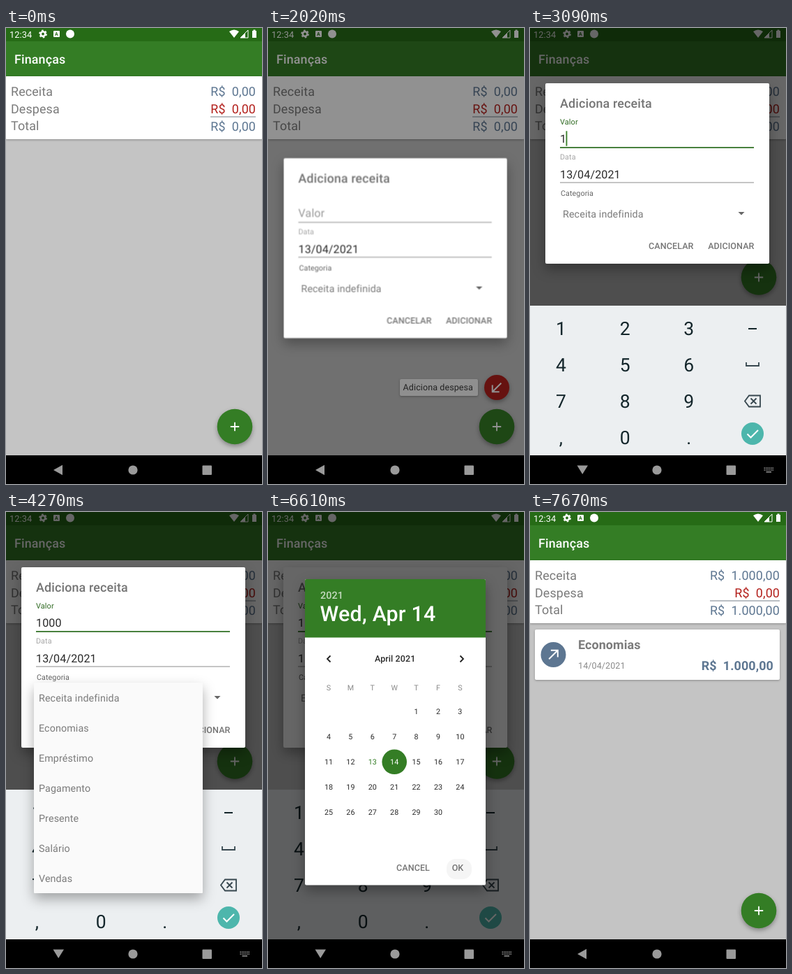
An HTML page for the animation above (8 s loop, 367 by 652 pixels).

```html
<!DOCTYPE html>
<html lang="pt-BR">
<head>
<meta charset="utf-8">
<title>Finanças</title>
<style>
html, body { margin: 0; width: 100%; height: 100%; overflow: hidden; background: #000; }
svg { display: block; width: 367px; height: 652px; }
text { font-family: Roboto, "Noto Sans", sans-serif; letter-spacing: .008em; text-rendering: geometricPrecision; }
.low { filter: drop-shadow(0 1px 1.5px rgba(0,0,0,.3)); }
.mid { filter: drop-shadow(0 3px 3px rgba(0,0,0,.32)); }
.high { filter: drop-shadow(0 8px 9px rgba(0,0,0,.32)); }
</style>
</head>
<body>
<svg id="stage" viewBox="0 0 367 652"></svg>
<script>
const LOOP = 8000;
const GREEN = '#347d25', SLATE = '#5d7691', RED = '#b3201c', GREY = '#7b7b7b', INK = '#2a2a2a';
const BODY = 14.29, FIELD = 16.07, TITLE = 17.86, SMALL = 12.5, TINY = 10.72;
const STANDARD = 'cubic-bezier(.4,0,.2,1)', OUT = 'cubic-bezier(0,0,.2,1)';
const stage = document.getElementById('stage');

function el(parent, tag, attrs = {}) {
  const node = document.createElementNS('http://www.w3.org/2000/svg', tag);
  for (const k in attrs) node.setAttribute(k, attrs[k]);
  parent.appendChild(node);
  return node;
}
const group = (p, attrs) => el(p, 'g', attrs);
const rect = (p, x, y, width, height, fill, more) => el(p, 'rect', { x, y, width, height, fill, ...more });
const disc = (p, cx, cy, r, fill, more) => el(p, 'circle', { cx, cy, r, fill, ...more });
const path = (p, d, fill, more) => el(p, 'path', { d, fill, ...more });
const line = (p, d, stroke, w = 1.5, more) => path(p, d, 'none', { stroke, 'stroke-width': w, ...more });

// Text whose capitals are centred on y
function text(p, x, y, str, size, fill, more) {
  const t = el(p, 'text', { x, y: y + size * .355, 'font-size': size, fill, ...more });
  t.textContent = str.replace(/  /g, '\u00a0\u00a0');
  return t;
}
const END = { 'text-anchor': 'end' }, MID = { 'text-anchor': 'middle' }, MEDIUM = { 'font-weight': 500 };

// steps: [start, end, value, easing]; equal start and end make a hard change
function track(node, prop, first, steps) {
  const frames = [{ offset: 0, [prop]: first }];
  let last = first;
  for (const [a, b, value, easing = 'linear'] of steps) {
    frames.push({ offset: a / LOOP, [prop]: last, easing }, { offset: b / LOOP, [prop]: value });
    last = value;
  }
  frames.push({ offset: 1, [prop]: last });
  node.animate(frames, { duration: LOOP, iterations: Infinity });
  return node;
}
const at = (t, value) => [t, t, value];
const fade = (node, ...steps) => track(node, 'opacity', 0, steps);
const show = (node, from, to) => fade(node, at(from, 1), at(to, 0));
const hide = (node, from, to) => track(node, 'opacity', 1, to ? [at(from, 0), at(to, 1)] : [at(from, 0)]);
const pivot = (node, x, y) => { node.style.transformOrigin = `${x}px ${y}px`; return node; };

function arrow(p, x, y, turn) {
  line(p, 'M-7 7L7-7M-4-7H7V4', '#fff', 2.2, { transform: `translate(${x} ${y}) rotate(${turn}) scale(.9)` });
}

/* App screen */
const app = group(stage);
rect(app, 0, 0, 367, 652, '#c4c4c4');
rect(app, 0, 0, 367, 20, '#266b16');
rect(app, 0, 19, 367, 50, GREEN);
text(app, 5, 9.2, '12:34', 12.8, '#fff');
disc(app, 53, 8.5, 3.2, 'none', { stroke: '#fff', 'stroke-width': 2.6 });
disc(app, 53, 8.5, 5, 'none', { stroke: '#fff', 'stroke-width': 1.8, 'stroke-dasharray': '2.6 2.636' });
rect(app, 68, 4, 9, 9, '#fff', { rx: 1 });
text(app, 72.5, 8.5, 'A', 7, '#266b16', { ...MID, 'font-weight': 700 });
disc(app, 92, 8.5, 6, '#fff');
path(app, 'M320 5Q327 0 334 5L327 14Z', '#fff');
path(app, 'M347 3V14H336Z', 'none', { stroke: '#fff' });
path(app, 'M343 7V14H336Z', '#fff');
path(app, 'M353 4H354.5V2.5H357.5V4H359V14H353Z', '#fff');
text(app, 12, 45, 'Finanças', TITLE, '#fff', MEDIUM);

const summary = group(app);
rect(summary, 0, 69, 367, 90, '#fff', { rx: 1, class: 'low' });
['Receita', 'Despesa', 'Total'].forEach((s, i) => text(summary, 7, 91 + 24.5 * i, s, TITLE, GREY));
text(summary, 358, 115.5, 'R$  0,00', TITLE, RED, END);
function totals(sum, x) {
  const g = group(summary);
  for (const y of [91, 140.5]) text(g, 358, y, sum, TITLE, SLATE, END);
  rect(g, x, 126.5, 358 - x, 1, '#77808a');
  return g;
}
hide(totals('R$  0,00', 293), 7540);
show(totals('R$  1.000,00', 258), 7540, LOOP);

const entry = show(group(app), 7540, LOOP);
rect(entry, 7, 168, 351, 72, '#fff', { rx: 2, class: 'low' });
disc(entry, 33.5, 204, 18, SLATE);
arrow(entry, 33.5, 204, 0);
text(entry, 69, 190, 'Economias', TITLE, GREY, { 'font-weight': 700 });
text(entry, 69, 219.5, '14/04/2021', SMALL, '#8a8a8a');
text(entry, 349, 219.5, 'R$  1.000,00', TITLE, SLATE, { ...END, 'font-weight': 700 });

// Floating button and its menu
function action(y, left, label, fill, turn, open, close) {
  const g = group(app);
  fade(g, [open, open + 100, 1], [close, close + 60, 0]);
  rect(g, left, y - 12, 301 - left, 24, '#fafafa', { rx: 2, class: 'low' });
  text(g, 294, y, label, SMALL, '#3c3c3c', END);
  const button = pivot(group(g, { class: 'mid' }), 328, y);
  disc(button, 328, y, 18, fill);
  arrow(button, 328, y, turn);
  track(button, 'scale', '0', [[open, open + 150, '1', OUT], [close, close + 60, '.3']]);
  return g;
}
const income = action(465, 197.5, 'Adiciona receita', SLATE, 0, 920, 1930);
action(514, 189, 'Adiciona despesa', RED, 180, 870, 2040);
const press = group(income);
rect(press, 197.5, 453, 103.5, 24, '#000', { rx: 2, opacity: .5 });
disc(press, 328, 465, 18, '#fff');
fade(press, [1590, 1660, .16]);

const fab = group(app);
track(fab, 'translate', '0 0', [at(2760, '0 -213.5px'), at(7560, '0 0')]);
disc(fab, 328, 570, 25.3, GREEN, { class: 'mid' });
fade(disc(fab, 328, 570, 25.3, '#fff'), [840, 920, .15], [960, 1110, 0]);
const plus = pivot(line(fab, 'M321.8 570H334.2M328 563.8V576.2', '#fff', 1.8), 328, 570);
track(plus, 'rotate', '0deg', [[850, 1000, '45deg', STANDARD], [1920, 2030, '0deg', OUT]]);

const shade = rect(stage, 0, 0, 367, 652, '#000');
fade(shade, [1920, 2060, .6], at(5550, 0), at(6630, .6), [7520, 7665, 0]);

/* Keyboard */
const keys = group(stage);
fade(keys, [2740, 2900, 1], [7530, 7650, 0]);
track(keys, 'translate', '0 24px', [[2740, 2980, '0 0', OUT], [7530, 7650, '0 24px', 'ease-in']]);
rect(keys, 0, 397, 367, 240, '#eceff1');
['123', '456', '789', ',0.'].forEach((row, r) => [...row].forEach((c, i) =>
  text(keys, 44.5 + 91.7 * i, 430 + 52 * r, c, 26.5, '#14262b', MID)));
line(keys, 'M313 430H325', '#14262b', 2);
line(keys, 'M310 478V483H328V478', '#37474f', 1.8);
line(keys, 'M314 525.5H330V541.5H314L308 533.5ZM316.5 529.5L324.5 537.5M324.5 529.5L316.5 537.5', '#37474f', 1.8);
disc(keys, 319, 580, 16, '#4db6ac');
line(keys, 'M311.5 580.5L316.5 585.5L327 575', '#fff', 2);

/* Entry dialog */
const dialog = pivot(group(stage), 182.5, 208);
fade(dialog, [1920, 1995, 1], [7520, 7620, 0]);
track(dialog, 'scale', '.9', [[1920, 2110, '1', 'cubic-bezier(.1,.9,.2,1)']]);
const form = group(dialog);
track(form, 'translate', '0 107px', [[2780, 2980, '0 0', OUT]]);
rect(form, 22, 79, 321, 258, '#fff', { rx: 2, class: 'high' });
text(form, 43, 108, 'Adiciona receita', TITLE, '#757575', { ...MEDIUM, 'letter-spacing': '.0125em' });

const hint = pivot(text(form, 43, 157.5, 'Valor', FIELD, '#9a9a9a'), 43, 157.5);
track(hint, 'fill', '#9a9a9a', [[2600, 2770, '#2f6a22']]);
track(hint, 'scale', '1', [[2600, 2770, '.68', STANDARD]]);
track(hint, 'translate', '0 0', [[2600, 2770, '0 -23.5px', STANDARD]]);
rect(form, 43, 170.5, 278, 1, '#8c8c8c');
show(rect(form, 43, 170, 278, 1.8, '#3c7a30'), 2600, LOOP);

const typed = [3080, 3205, 3285, 3505];
typed.forEach((t, i) => show(text(form, 43, 158.5, '1000'.slice(0, i + 1), FIELD, INK, { 'letter-spacing': 0 }), t, typed[i + 1] || LOOP));
const caret = rect(form, 42.5, 147.3, 1.8, 21.4, GREEN);
track(caret, 'translate', '0 0', typed.map((t, i) => at(t, 9.03 * (i + 1) + 'px 0')));
fade(caret, ...[2610, 3860, 4960, 5650, 6640, 6960, 7280].map((t, i) => at(t, 1 - i % 2)));

const dateHint = text(form, 43, 184.5, 'Data', TINY, '#a6a6a6');
track(dateHint, 'fill', '#a6a6a6', [at(5265, '#777'), at(5640, '#a6a6a6')]);
const dateLine = rect(form, 43, 220.5, 278, 1, '#8c8c8c');
track(dateLine, 'fill', '#8c8c8c', [at(5265, '#444'), at(5640, '#8c8c8c')]);
hide(text(form, 43, 209, '13/04/2021', FIELD, INK), 6630);
show(text(form, 43, 209, '14/04/2021', FIELD, INK), 6630, LOOP);

text(form, 44, 236.5, 'Categoria', TINY, '#666', { 'letter-spacing': '.015em' });
hide(text(form, 47, 265.5, 'Receita indefinida', BODY, GREY), 4900);
show(text(form, 47, 265.5, 'Economias', BODY, GREY), 4900, LOOP);
const ripple = pivot(disc(form, 303, 265, 18, '#000'), 303, 265);
fade(ripple, [3815, 3880, .1], [4000, 4260, 0]);
track(ripple, 'scale', '.4', [[3815, 4000, '1', OUT]]);
path(form, 'M298.5 263H307.5L303 267.5Z', '#666');
text(form, 234.5, 312, 'CANCELAR', SMALL, '#757575', { ...END, ...MEDIUM });
text(form, 321.5, 312, 'ADICIONAR', SMALL, '#757575', { ...END, ...MEDIUM });
fade(rect(form, 247, 297, 83, 31, '#000', { rx: 2 }), [7515, 7550, .08]);

/* Category list */
const list = pivot(group(stage), 161, 265);
fade(list, [3900, 4080, 1], [4900, 5080, 0]);
track(list, 'scale', '1 .55', [[3900, 4200, '1 1', OUT]]);
rect(list, 40, 244, 242, 301, '#fafafa', { rx: 1, class: 'high' });
fade(rect(list, 40, 287, 242, 43, '#000'), [4745, 4820, .1], [4860, 5000, 0]);
['Receita indefinida', 'Economias', 'Empréstimo', 'Pagamento', 'Presente', 'Salário', 'Vendas']
  .forEach((s, i) => text(list, 47, 265.5 + 43 * i, s, BODY, GREY));

/* Date picker */
const veil = rect(stage, 0, 0, 367, 652, '#000');
fade(veil, [5545, 5605, .42], [5605, 5665, .6], at(6630, 0));
const picker = pivot(group(stage), 182.5, 314.5);
fade(picker, [5545, 5660, 1], [6630, 6730, 0]);
track(picker, 'scale', '.94', [[5545, 5660, '1', 'cubic-bezier(.1,.9,.2,1)']]);
rect(picker, 53, 96, 259, 437.5, '#fff', { rx: 2, class: 'high' });
path(picker, 'M53 179.5V98a2 2 0 0 1 2-2H310a2 2 0 0 1 2 2V179.5Z', GREEN);
text(picker, 75, 119, '2021', BODY, '#c4dabf', MEDIUM);
text(picker, 182.2, 210, 'April 2021', SMALL, INK, { ...MID, ...MEDIUM });
line(picker, 'M89.5 205.5L85 210L89.5 214.5M275.5 205.5L280 210L275.5 214.5', '#222', 1.8);

const colX = i => 87 + 31.4 * i;
const dayX = d => colX((d + 3) % 7), dayY = d => 285.5 + 35.9 * Math.floor((d + 3) / 7);
const day = (p, d, fill) => text(p, dayX(d), dayY(d), String(d), TINY, fill, MID);
[...'SMTWTFS'].forEach((c, i) => text(picker, colX(i), 251.3, c, TINY, '#8a8a8a', MID));
for (let d = 1; d <= 30; d++) day(picker, d, d === 13 ? GREEN : INK);

function chosen(d, label) {
  const g = group(picker);
  text(g, 74.5, 145.5, label, 30.36, '#fff', { ...MEDIUM, 'letter-spacing': 0 });
  disc(g, dayX(d), dayY(d), 17.8, GREEN);
  day(g, d, '#fff');
  return g;
}
hide(chosen(13, 'Tue, Apr 13'), 6130);
show(chosen(14, 'Wed, Apr 14'), 6130, LOOP);
fade(rect(picker, 256, 496, 36, 29, '#000', { rx: 13 }), at(6600, .04), [6610, 6660, .09]);
text(picker, 232, 508.5, 'CANCEL', SMALL, '#757575', { ...END, ...MEDIUM });
text(picker, 272, 508.5, 'OK', SMALL, '#757575', { ...MID, ...MEDIUM });

/* Navigation bar */
const nav = group(stage);
rect(nav, 0, 611, 367, 41, '#000');
hide(path(nav, 'M68 632L81 624.8V639.2Z', '#9a9a9a'), 2740, 7560);
const typing = show(group(nav), 2740, 7560);
path(typing, 'M67.5 625.5H83L75.2 638Z', '#9a9a9a');
for (let r = 0; r < 2; r++)
  line(typing, `M335.5 ${629.3 + 2.6 * r}H349`, '#9a9a9a', 1.5, { 'stroke-dasharray': '1.5 .9' });
line(typing, 'M338.5 634.8H346', '#9a9a9a', 1.5);
disc(nav, 182, 632, 6.6, '#9a9a9a');
rect(nav, 281.5, 625.5, 13.5, 13.5, '#9a9a9a', { rx: 1 });
</script>
</body>
</html>
```
